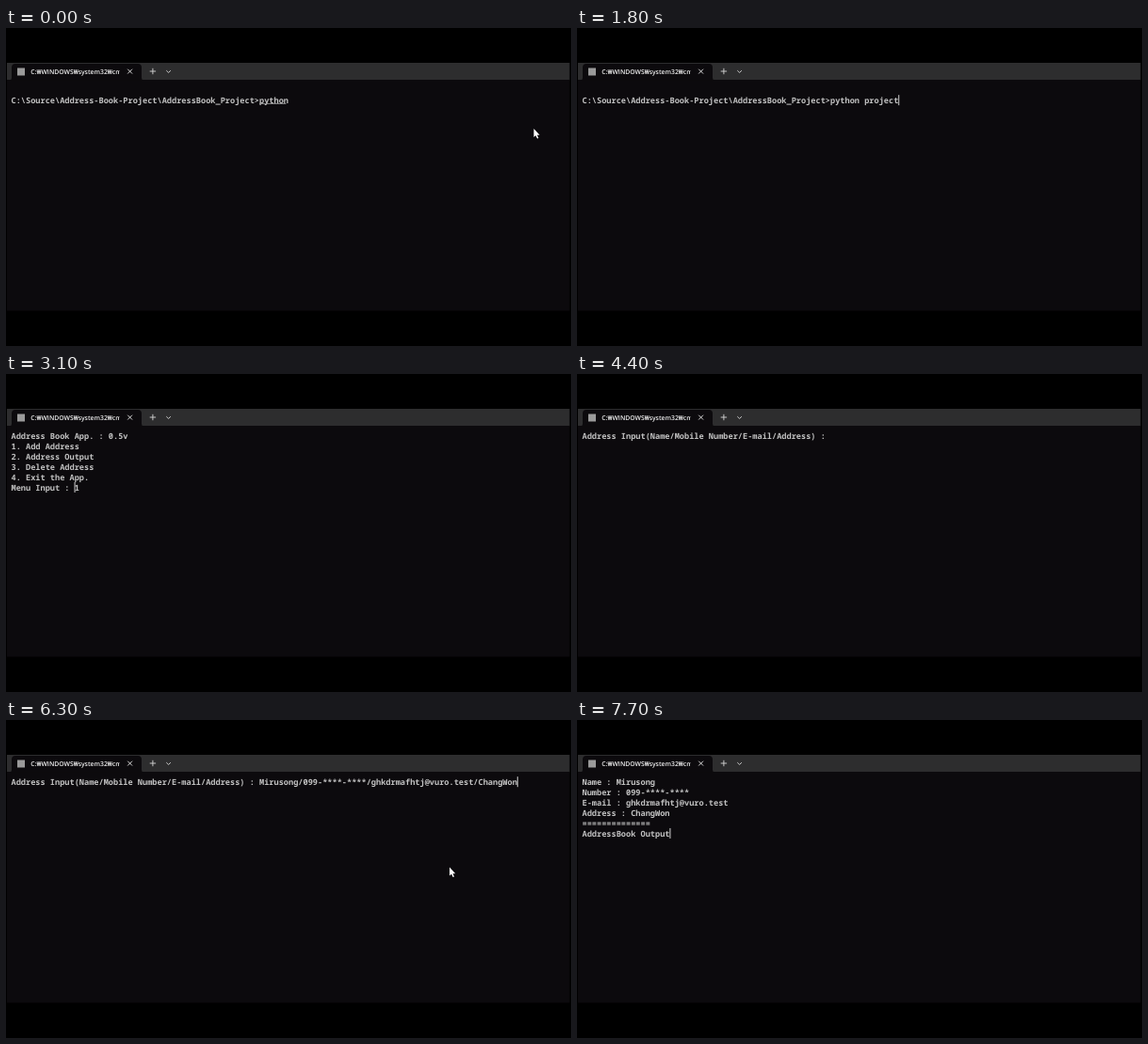
Write an HTML page with a canvas that moves like this. It is 600 px wide and 338 px high and loops after 8000 ms.

```html
<!DOCTYPE html>
<html lang="en">
<head>
<meta charset="utf-8">
<title>Address book terminal</title>
<style>
  html, body { margin: 0; width: 100%; height: 100%; overflow: hidden; background: #000; }
  canvas { display: block; width: 600px; height: 338px; }
</style>
</head>
<body>
<canvas id="stage" width="600" height="338"></canvas>
<script>
const ctx = document.getElementById('stage').getContext('2d');
ctx.textRendering = 'geometricPrecision';

const LOOP = 8000;
const CELL = 5.167, ROW = 10.95, LEFT = 5.5, TOP = 60.2;
const TEXT = '#c2c2c2';

const prompt = 'C:\\Source\\Address-Book-Project\\AddressBook_Project>';
const question = 'Address Input(Name/Mobile Number/E-mail/Address) : ';
const person = { name: 'Mirusong', phone: '099-****-****', mail: 'ghkdrmafhtj@vuro.test', city: 'ChangWon' };
const entry = Object.values(person).join('/');

const menu = [
  'Address Book App. : 0.5v', '1. Add Address', '2. Address Output',
  '3. Delete Address', '4. Exit the App.', 'Menu Input : '
];
const choose = key => [...menu.slice(0, -1), menu[5] + key];
const output = [
  'Name : ' + person.name, 'Number : ' + person.phone, 'E-mail : ' + person.mail,
  'Address : ' + person.city, '='.repeat(14), 'AddressBook Output'
];

const shell = typed => ['', prompt + typed];
const command = n => shell('python project.py'.slice(0, n));
const form = n => [question + entry.slice(0, n)];

// Each step: start time, lines, then cursor [col, row], underlined cols [from, to, row], mouse tip [x, y]
const steps = [
  [0, command(6), { underline: [51, 56.5, 1], mouse: [560.5, 107] }],
  [100, command(7), { cursor: [58, 1] }],
  [400, command(8), { cursor: [58, 1], underline: [58, 59, 1] }],
  [500, command(9), { cursor: [58, 1], underline: [58, 60, 1] }],
  [600, command(10), { underline: [58, 61, 1] }],
  [800, command(10), { cursor: [58, 1], underline: [58, 61, 1] }],
  [1000, command(10), { underline: [58, 61, 1] }],
  [1200, command(12), { cursor: [58, 1], underline: [58, 63, 1] }],
  [1300, command(13), { cursor: [58, 1], underline: [58, 63.7, 1] }],
  [1500, command(14), { underline: [58, 65, 1] }],
  [1800, command(14), { cursor: [65, 1] }],
  [1900, command(15), { cursor: [66, 1] }],
  [2100, command(15), {}],
  [2300, command(16), {}],
  [2500, command(17), { cursor: [0, 2] }],
  [2600, menu, { cursor: [13, 5] }],
  [2900, menu, {}],
  [3100, choose(1), { cursor: [13, 5] }],
  [3400, form(0), { cursor: [51, 0] }],
  [3900, form(0), {}],
  [4200, form(0), { cursor: [51, 0] }],
  [4400, form(0), {}],
  [4700, form(4), { cursor: [55, 0] }],
  [4800, form(9), { cursor: [60, 0] }],
  [4900, form(15), { cursor: [66, 0] }],
  [5000, form(22), { cursor: [73, 0], mouse: [537, 101] }],
  ...[5200, 5500, 5700, 6000, 6300].map((time, i) =>
    [time, form(53), { cursor: i % 2 ? null : [104, 0], mouse: [471, 156.5] }]),
  [6500, form(53), { cursor: [0, 1] }],
  [7000, menu, {}],
  [7100, menu, { cursor: [13, 5] }],
  [7600, choose(2), { cursor: [13, 5] }],
  [7700, output, { cursor: [18, 5] }]
];

function fillRect(color, x, y, w, h) {
  ctx.fillStyle = color;
  ctx.fillRect(x, y, w, h);
}

function stroke(path, color = '#d6d6d6') {
  ctx.strokeStyle = color;
  ctx.lineWidth = 0.9;
  ctx.stroke(new Path2D(path));
}

function drawWindow() {
  fillRect('#000', 0, 0, 600, 338);
  fillRect('#2d2d2e', 1, 37, 597.5, 18.5);
  fillRect('#0c0a0d', 1, 55, 597.5, 245.5);
  ctx.fillStyle = '#0c0a0d';
  ctx.fill(new Path2D('M4 55.5Q6 55 6 53V42Q6 38 10 38H140Q144 38 144 42V53Q144 55 146 55.5Z'));

  fillRect('#9a9a9a', 12, 42.5, 8, 8);
  ctx.save();
  ctx.beginPath();
  ctx.rect(26, 40, 94.5, 14);
  ctx.clip();
  ctx.fillStyle = '#f2f2f2';
  ctx.font = '600 6.8px "Open Sans", "Noto Sans", sans-serif';
  ctx.fillText('C:₩WINDOWS₩system32₩cmd.exe', 26.2, 48.8);
  ctx.restore();

  stroke('M129.2 43.7l4.8 4.8m0-4.8l-4.8 4.8', '#eee');
  stroke('M152.7 46h6.4m-3.2-3.2v6.4');
  stroke('M170.3 45.2l2.3 2.2 2.3-2.2');
}

function drawLines(lines) {
  ctx.fillStyle = TEXT;
  ctx.font = '600 8.61px "Noto Sans Mono", "DejaVu Sans Mono", monospace';
  lines.forEach((line, row) => [...line].forEach((char, col) =>
    ctx.fillText(char, LEFT + col * CELL, TOP + row * ROW + 8.6)));
}

function drawMouse([x, y]) {
  ctx.save();
  ctx.translate(x, y);
  ctx.fillStyle = '#fff';
  ctx.fill(new Path2D('M0 0V9L2 7.2 3.6 10.6 5 10 3.5 6.7H6.2Z'));
  ctx.restore();
}

function render(time) {
  const [, lines, { cursor, underline, mouse }] = steps.findLast(step => step[0] <= time);
  drawWindow();
  drawLines(lines);
  if (underline) {
    const [from, to, row] = underline;
    fillRect('#a0a0a0', LEFT + from * CELL, TOP + row * ROW + 9, (to - from) * CELL, 0.8);
  }
  if (cursor) fillRect('#d0d0d0', LEFT + cursor[0] * CELL - 0.1, TOP + cursor[1] * ROW, 1, 11);
  if (mouse) drawMouse(mouse);
}

const start = performance.now();
function tick() {
  render((performance.now() - start) % LOOP);
  requestAnimationFrame(tick);
}
tick();
</script>
</body>
</html>
```
